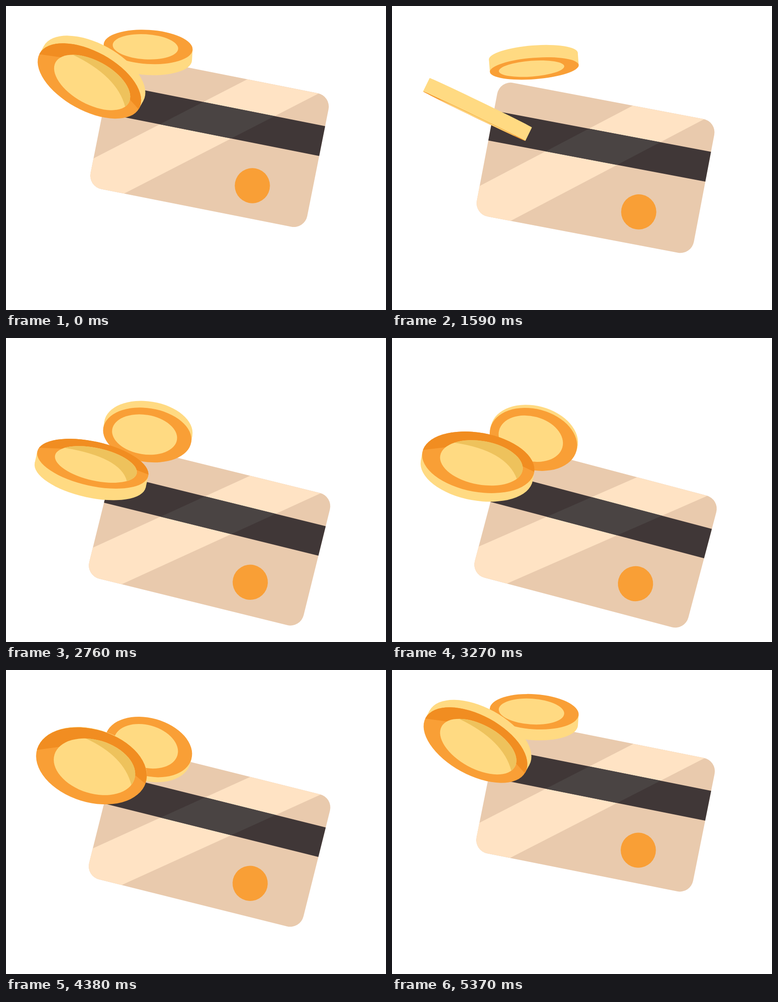
An HTML page with a canvas for the animation above (5.4 s loop, 836x670 px).

```html
<!DOCTYPE html>
<html lang="en">
<head>
<meta charset="utf-8">
<title>Card and coins</title>
<style>
  html, body { margin: 0; width: 100%; height: 100%; overflow: hidden; background: #fff; }
  canvas { display: block; }
</style>
</head>
<body>
<canvas id="stage" width="836" height="670"></canvas>
<script>
const ctx = document.getElementById('stage').getContext('2d');
const LOOP = 5400, STEP = 30, RAD = Math.PI / 180;

const C = {
  card: '#e9caad', gloss: '#ffe3c4', stripe: '#403737', stripeGloss: '#4a4443',
  orange: '#f99f36', orangeDark: '#f18d21', yellow: '#ffda82', yellowDark: '#eec25c'
};

// a slow sway around mid that peaks at the given time
const sway = (t, mid, amp, peak) => mid + amp * Math.cos(2 * Math.PI * (t - peak) / LOOP);

// a, b: half axes; thick: rim height; shift: offset of the inner disc;
// turn: flip angle at t = 0; dir: flip direction; y and tilt: [mid, amp, peak]
const backCoin = { x: 312, a: 98, b: 69, thick: 29, shift: -6, turn: 33, dir: -1,
  y: [152.9, -67.3, 620], tilt: [6, -11.8, 1170] };
const frontCoin = { x: 188.1, a: 125, b: 80, thick: 33, shift: 7, turn: 125.7, dir: 1,
  y: [222.9, -67.5, 175], tilt: [21, 10.8, 640], shaded: true };
const INNER = 0.736;

function fillPath(color, build) {
  ctx.fillStyle = color;
  ctx.beginPath();
  build();
  ctx.fill();
}

function polygon(color, points) {
  fillPath(color, () => {
    points.forEach(p => ctx.lineTo(p[0], p[1]));
    ctx.closePath();
  });
}

function ellipse(color, x, y, rx, ry) {
  fillPath(color, () => ctx.ellipse(x, y, rx, ry, 0, 0, 2 * Math.PI));
}

function inPlace(x, y, degrees, draw) {
  ctx.save();
  ctx.translate(x, y);
  ctx.rotate(degrees * RAD);
  draw();
  ctx.restore();
}

function drawCard(t) {
  inPlace(447.8, sway(t, 366, -74.2, 350), sway(t, 12.5, -2.5, 900), () => {
    const band = [[55, -150], [215, -150], [-162, 150], [-322, 150]];
    ctx.beginPath();
    ctx.roundRect(-243, -150, 486, 300, 30);
    ctx.clip();
    ctx.fillStyle = C.card;
    ctx.fillRect(-244, -151, 488, 302);
    polygon(C.gloss, band);

    ctx.fillStyle = C.stripe;
    ctx.fillRect(-244, -82, 488, 67);
    ctx.beginPath();
    ctx.rect(-244, -82, 488, 67);
    ctx.clip();
    polygon(C.stripeGloss, band);
  });
  // plain disc as the card's emblem
  inPlace(447.8, sway(t, 366, -74.2, 350), sway(t, 12.5, -2.5, 900), () => {
    ellipse(C.orange, 111.5, 77.8, 38.7, 38.7);
  });
}

// dark upper part of the ring
function shadeRing(coin, b, lift) {
  const pts = [[-1.1, 0.1 - lift * 0.35], [-0.5, -0.34 - lift * 0.1], [0.65, -0.2],
    [1.1, 0.1 - lift * 0.2], [1.1, -1.2], [-1.1, -1.2]];
  ctx.save();
  ctx.beginPath();
  ctx.ellipse(0, 0, coin.a, b, 0, 0, 2 * Math.PI);
  ctx.clip();
  polygon(C.orangeDark, pts.map(p => [p[0] * coin.a, p[1] * b]));
  ctx.restore();
}

// crescent of shade inside the inner disc, sliding as the coin flips
function shadeInner(coin, b, cos, lift) {
  const rx = coin.a * INNER, ry = b * INNER;
  const from = (-112 - 42 * Math.abs(cos)) * RAD;
  const to = (14 + 35 * lift) * RAD;
  const mid = (from + to) / 2;
  fillPath(C.yellowDark, () => {
    ctx.ellipse(coin.shift, 0, rx, ry, 0, from, to);
    ctx.quadraticCurveTo(
      coin.shift + 0.93 * rx * Math.cos(mid), 0.93 * ry * Math.sin(mid),
      coin.shift + rx * Math.cos(from), ry * Math.sin(from));
  });
}

function drawCoin(coin, t) {
  const flip = (((coin.turn + coin.dir * 180 * t / LOOP) % 180) + 180) % 180;
  const cos = Math.cos(flip * RAD);
  const b = coin.b * Math.sin(flip * RAD);
  const half = coin.thick * cos / 2;

  inPlace(coin.x, sway(t, ...coin.y), sway(t, ...coin.tilt), () => {
    ellipse(C.yellow, 0, half, coin.a, b);
    ctx.fillRect(-coin.a, -Math.abs(half), 2 * coin.a, 2 * Math.abs(half));

    ctx.translate(0, -half);
    const lift = Math.max(0, cos) ** 2;
    ellipse(C.orange, 0, 0, coin.a, b);
    if (coin.shaded) shadeRing(coin, b, lift);
    ellipse(C.yellow, coin.shift, 0, coin.a * INNER, b * INNER);
    if (coin.shaded) shadeInner(coin, b, cos, lift);
  });
}

const start = performance.now();

function frame() {
  const now = (performance.now() - start) % LOOP;
  const t = Math.floor(now / STEP) * STEP;
  ctx.fillStyle = '#fff';
  ctx.fillRect(0, 0, 836, 670);
  drawCard(t);
  drawCoin(backCoin, t);
  drawCoin(frontCoin, t);
  requestAnimationFrame(frame);
}
frame();
</script>
</body>
</html>
```
